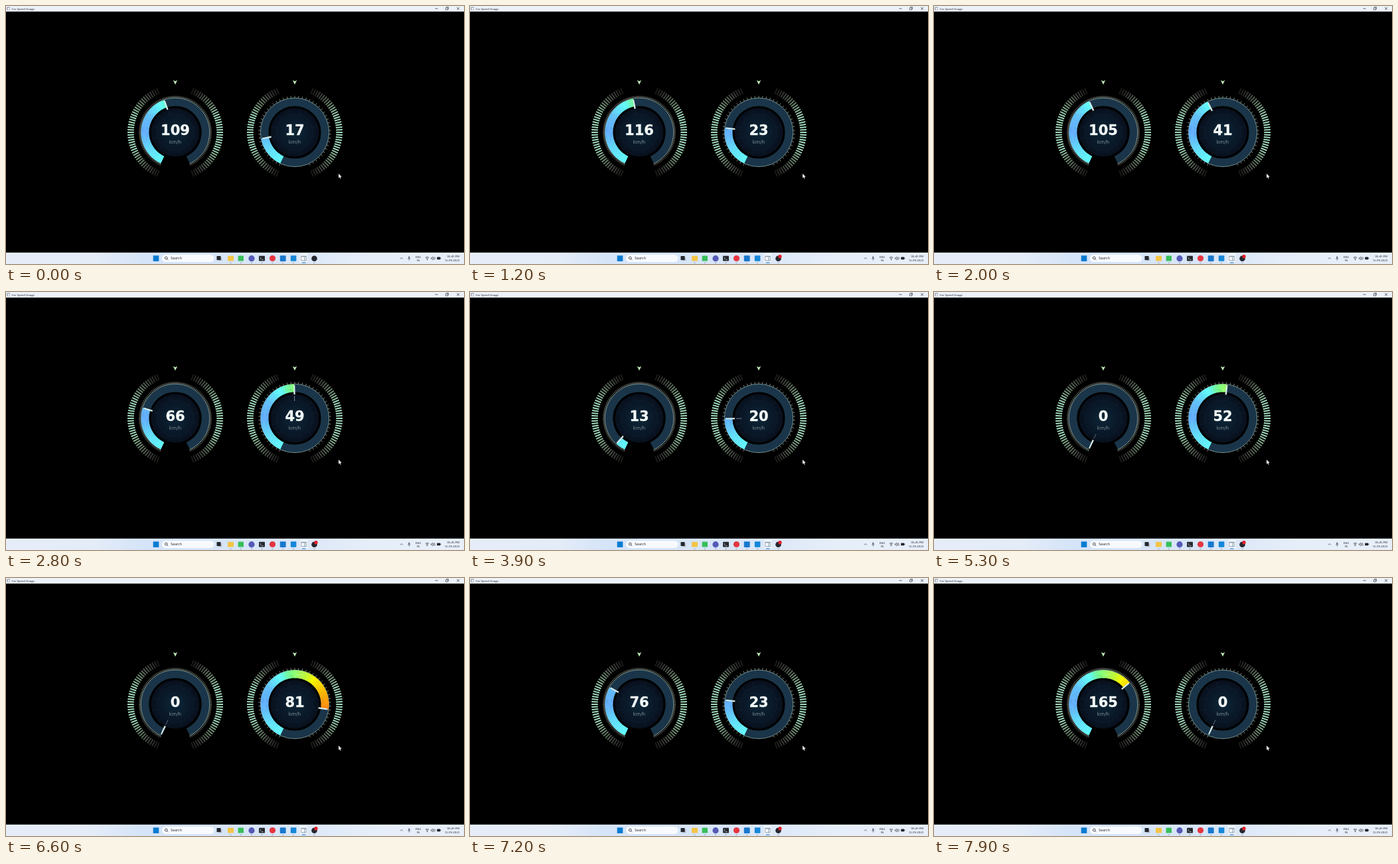
Animation, 690 px wide and 388 px high, one loop 8000 ms. Source, as an HTML page:

```html
<!DOCTYPE html>
<html lang="en">
<head>
<meta charset="utf-8">
<title>Car Speed Guage</title>
<style>
  html, body { margin: 0; width: 100%; height: 100%; overflow: hidden; background: #000; }
  svg { display: block; width: 100vw; height: 100vh; }
  .ui { font-family: "Open Sans", "Noto Sans", sans-serif; fill: #1c1f26; }
  .dial { font-family: "DejaVu Sans", sans-serif; text-anchor: middle; }
</style>
</head>
<body>
<svg id="stage" viewBox="0 0 690 388">
  <defs>
    <radialGradient id="hub">
      <stop offset="0" stop-color="#0d2738"/>
      <stop offset=".55" stop-color="#0a1a2a"/>
      <stop offset="1" stop-color="#080f1c"/>
    </radialGradient>
    <linearGradient id="bar">
      <stop offset="0" stop-color="#e6edf8"/>
      <stop offset=".19" stop-color="#e4ecf8"/>
      <stop offset=".3" stop-color="#d5e4f8"/>
      <stop offset=".6" stop-color="#d9e6f8"/>
      <stop offset=".8" stop-color="#e6eef9"/>
      <stop offset="1" stop-color="#e8eff9"/>
    </linearGradient>
  </defs>
  <rect width="690" height="388"/>
</svg>
<script>
const stage = document.getElementById('stage');
const LOOP = 8000, STEP = 100, START = -155, SWEEP = 310;

// Speed over time: [seconds, value], straight between entries.
const leftKeys = [[0, 109.9], [0.83, 69.6], [1.355, 136.5], [4.187, 0], [6.6, 0], [8, 178.5]];
const rightKeys = [[0, 17.5], [0.12, 0], [0.16, 0], [2.74, 58.2], [3.13, 3.4], [6.75, 85.2], [7.37, 0], [8, 0]];

// Bar colour by angle: [degrees, hue, lightness].
const hues = [[-155, 180, 70], [-125, 190, 70], [-90, 211, 70], [-60, 203, 70], [-25, 176, 70],
  [-6, 120, 75], [8, 92, 70], [36, 60, 50], [62, 46, 50], [96, 31, 54], [155, 0, 50]];

function add(parent, tag, attrs, text) {
  const el = document.createElementNS('http://www.w3.org/2000/svg', tag);
  for (const key in attrs) el.setAttribute(key, attrs[key]);
  if (text !== undefined) el.textContent = text;
  return parent.appendChild(el);
}

function sample(keys, x, column = 1) {
  const i = Math.max(1, keys.findIndex(k => k[0] >= x));
  const a = keys[i - 1], b = keys[i];
  return a[column] + (b[column] - a[column]) * (x - a[0]) / (b[0] - a[0]);
}

function polar(r, deg) {
  const a = deg * Math.PI / 180;
  return `${(r * Math.sin(a)).toFixed(2)} ${(-r * Math.cos(a)).toFixed(2)}`;
}

const spoke = (r1, r2, deg) => `M${polar(r1, deg)}L${polar(r2, deg)}`;
const arc = (r, a, b) => `M${polar(r, a)}A${r} ${r} 0 ${b - a > 180 ? 1 : 0} 1 ${polar(r, b)}`;

function spokes(r1, r2, from, to, gap) {
  let d = '';
  for (let a = from; a <= to + 0.01; a += gap) d += spoke(r1, r2, a);
  return d;
}

function makeGauge(cx, max, keys, fullRing) {
  const g = add(stage, 'g', { transform: `translate(${cx} 190)`, fill: 'none' });

  for (let i = -21; i <= 21; i++) {
    const a = i * 3.2;
    const fade = Math.min(1, Math.max(0, (70 - Math.abs(a)) / 48));
    for (const side of [-90, 90]) {
      add(g, 'path', {
        d: spoke(62.3, 72, side + a), 'stroke-width': 2,
        stroke: `hsl(${85 + 63 * fade} ${4 + 38 * fade * fade}% ${52 + 22 * fade}%)`,
        opacity: 0.15 + 0.85 * fade
      });
    }
  }
  add(g, 'path', { d: 'M-3.2-78.6L0-76.8L3.2-78.6L0-71.8Z', fill: '#c2f0ba' });

  const track = { stroke: '#1a3549', 'stroke-width': 11.8 };
  const rim = { stroke: '#a9cfcb', 'stroke-width': 0.65 };
  for (const [r, style] of [[45.5, track], [51.7, rim]]) {
    if (fullRing) add(g, 'circle', { r, ...style });
    else add(g, 'path', { d: arc(r, START, -START), ...style });
  }
  const gap = SWEEP / (fullRing ? 50 : 125);
  add(g, 'path', { d: spokes(52, 54.8, START, -START, gap), stroke: '#d3dccb', 'stroke-width': 0.65 });

  add(g, 'circle', { r: 36.5, fill: 'url(#hub)' });
  add(g, 'circle', { r: 27, stroke: '#11263a', 'stroke-width': 0.5 });
  add(g, 'path', { d: spokes(27, 36, 15, 345, 30), stroke: '#11263a', 'stroke-width': 0.5 });

  const segments = [];
  for (let a = START; a < -START; a += 2.5) {
    const stroke = `hsl(${sample(hues, a + 1)} 100% ${sample(hues, a + 1, 2)}%)`;
    segments.push({ a, el: add(g, 'path', { stroke, 'stroke-width': 11.8 }) });
  }
  const needle = add(g, 'g', {});
  add(needle, 'path', { d: 'M-1.2-36L1.2-36L.9-50L-.9-50Z', fill: '#d9efee' });
  const tail = add(needle, 'path', { d: 'M0-26V-34', stroke: '#a3b5cc', 'stroke-width': 0.8 });
  const number = add(g, 'text', {
    class: 'dial', y: 4, 'font-size': 21, 'font-weight': 700,
    fill: '#f4fbf8', stroke: '#f4fbf8', 'stroke-width': 0.3
  });
  add(g, 'text', { class: 'dial', y: 17, 'font-size': 7.3, fill: '#7f8d93' }, 'km/h');

  return seconds => {
    const value = sample(keys, seconds);
    const angle = START + SWEEP * value / max;
    for (const { a, el } of segments) {
      el.setAttribute('d', angle > a + 0.05 ? arc(45.5, a, Math.min(a + 2.8, angle)) : '');
    }
    needle.setAttribute('transform', `rotate(${angle})`);
    const offAxis = Math.abs(angle - 90 * Math.round(angle / 90));
    tail.setAttribute('opacity', value <= 0 ? 0.6 : offAxis < 2.5 ? 0.9 : 0.06);
    number.textContent = Math.floor(value);
  };
}

function label(x, y, size, text, anchor = 'start') {
  add(stage, 'text', { class: 'ui', x, y, 'font-size': size, 'text-anchor': anchor }, text);
}

function line(d, color = '#20242b', width = 0.7) {
  return add(stage, 'path', { d, stroke: color, 'stroke-width': width, fill: 'none' });
}

function box(x, y, width, height, fill, rx = 0) {
  return add(stage, 'rect', { x, y, width, height, fill, rx });
}

function dot(cx, cy, r, fill) {
  return add(stage, 'circle', { cx, cy, r, fill });
}

function drawTitleBar() {
  box(0, 0, 690, 8.4, '#edf2fa');
  box(1.3, 1.6, 4.6, 4.6, '#8d98a5', 0.5);
  box(2.5, 2.7, 2.9, 2.9, '#f5f7fa');
  label(8.5, 5.7, 4.3, 'Car Speed Guage');
  line('M646.5 3.8h4M679.2 1.9l3.8 3.8m0-3.8l-3.8 3.8');
  line('M662.4 2.8h3v3h-3zM663.5 2.6v-1h3.1v3.1h-1', '#20242b', 0.6);
}

function drawTaskbar() {
  box(0, 370.8, 690, 17.2, 'url(#bar)');
  box(221.7, 375.3, 8.6, 8.6, '#087bd1');
  box(235, 374, 78.5, 11, '#f8fafe', 5.5);
  add(stage, 'circle', { cx: 241.3, cy: 379, r: 1.9, fill: 'none', stroke: '#20242b', 'stroke-width': 0.8 });
  line('M242.7 380.4l1.7 1.8');
  label(248, 381.4, 5.4, 'Search');

  box(319.3, 378, 6, 5.3, '#b5bcc6');
  box(317.5, 376, 6, 6, '#23272e');
  box(334, 375.8, 9, 7.6, '#f3c444', 0.8);
  box(349.6, 375.6, 8.4, 8, '#38bf59', 1.2);
  dot(370, 379.7, 4.6, '#555ab7');
  box(381, 375.8, 9, 7.8, '#25292f', 0.8);
  line('M382.6 378l1.7 1.5l-1.7 1.5M385 381.5h2.5', '#e9edf2', 0.7);
  dot(401.5, 379.5, 4.6, '#e53640');
  box(412.8, 375.2, 8.8, 8.8, '#1878cd', 1);
  box(428.8, 375.2, 8.6, 8.6, '#1687d9', 1);
  box(443.2, 372.6, 11, 13.4, '#f2f7fd', 1.5);
  box(444.4, 375.8, 8.4, 7.4, '#8c9ba8', 0.5);
  box(445.2, 377.3, 4.2, 5, '#f8fafc');
  box(450.2, 377.3, 1.9, 5, '#dce4ea');
  dot(464.5, 379.7, 4.3, '#242830');
  for (const x of [338.5, 353.8, 370, 385.5, 401.5, 417.2, 433.1, 464.5]) {
    box(x - 1.3, 385.7, 2.6, 0.8, '#7d8590', 0.4);
  }
  box(445.7, 385.5, 6, 1, '#1672c6', 0.5);

  line('M594.2 380.3l1.8-1.8l1.8 1.8');
  box(606.2, 376.5, 2.2, 4, '#626a80', 1.1);
  line('M605.2 379.5q2.1 3.7 4.2 0M607.3 381.4v1.5', '#626a80', 0.6);
  label(621, 378.7, 4.1, 'ENG', 'middle');
  label(621, 384, 4.1, 'IN', 'middle');
  line('M631.9 378.4q2.6-2.3 5.2 0M632.9 379.7q1.6-1.4 3.2 0');
  dot(634.5, 381.2, 0.8, '#20242b');
  line('M640.4 378.6h1.2l1.6-1.4v4.6l-1.6-1.4h-1.2zM644.4 378.3q1 1.2 0 2.4M645.5 377.3q1.8 2.2 0 4.4', '#20242b', 0.6);
  box(649.3, 377.5, 5, 3.8, '#20242b', 0.6);
  box(654.4, 378.6, 0.8, 1.6, '#20242b');
  label(683.3, 378.4, 4.35, '06:45 PM', 'end');
  label(683.3, 384, 4.35, '12-09-2023', 'end');
}

drawTitleBar();
drawTaskbar();
const recording = dot(467, 376.8, 2.7, '#e3202b');
const gauges = [makeGauge(255, 250, leftKeys, false), makeGauge(435, 100, rightKeys, true)];
add(stage, 'path', {
  d: 'M501 252v6.8l1.6-1.4l1.1 2.4l1.2-.5l-1.1-2.4h2.1z',
  fill: '#fff', stroke: '#222', 'stroke-width': 0.3
});

function render(ms) {
  const t = Math.floor(ms % LOOP / STEP) * STEP;
  gauges.forEach(update => update(t / 1000));
  recording.setAttribute('visibility', t >= 500 ? 'visible' : 'hidden');
}

let origin;
function tick(now) {
  origin ??= now;
  render(now - origin);
  requestAnimationFrame(tick);
}
render(0);
requestAnimationFrame(tick);
</script>
</body>
</html>
```
